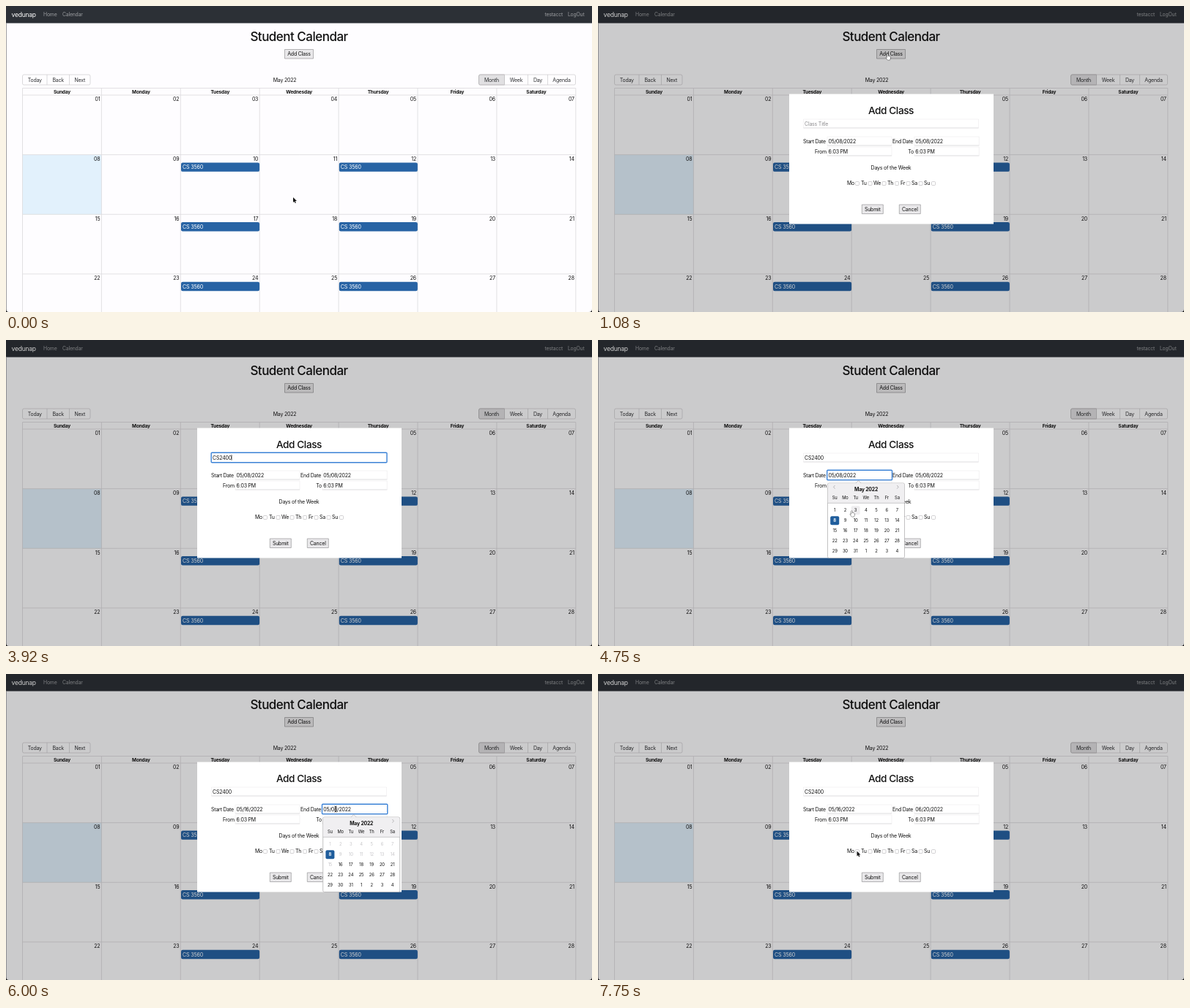
An HTML page with a canvas for the animation above (8 s loop, 800 px wide and 419 px high).

```html
<!DOCTYPE html>
<html lang="en">
<head>
<meta charset="utf-8">
<title>Student Calendar</title>
<style>
  html, body { margin: 0; width: 100%; height: 100%; overflow: hidden; background: #fefdff; }
  canvas { display: block; width: 800px; height: 419px; }
</style>
</head>
<body>
<canvas id="stage" width="800" height="419"></canvas>
<script>
const ctx = document.getElementById('stage').getContext('2d');
const LOOP = 8000;
const INK = '#111', BLUE = '#2763a4', FOCUS = '#3b82d6';
const WEEKDAYS = ['Sunday', 'Monday', 'Tuesday', 'Wednesday', 'Thursday', 'Friday', 'Saturday'];

const time = {
  modal: 1040, titleFocus: 2050, typing: [2720, 3000, 3380, 3540, 3700, 3860],
  startOpen: 4450, startPick: 5150, endOpen: 5540, nextMonth: 6450, endPick: 7150
};

// Pointer stops: time, x, y
const stops = [
  [0, 392, 262], [80, 392, 262], [670, 395.5, 66], [1400, 395.5, 66], [1900, 383, 161],
  [4150, 383, 161], [4420, 352, 185], [4480, 352, 185], [4730, 346.5, 234], [4800, 346.5, 234],
  [5080, 338, 259], [5180, 338, 259], [5480, 450, 185], [6030, 450, 185], [6380, 528, 200],
  [6500, 528, 200], [7020, 457, 273], [7500, 457, 273], [7740, 353.5, 242.5]
];
const pointerKinds = [
  [0, 'arrow'], [600, 'hand'], [1500, 'arrow'], [1830, 'beam'], [2720, 'none'], [4150, 'beam'],
  [4560, 'hand'], [5190, 'arrow'], [5440, 'beam'], [6120, 'arrow'], [6320, 'hand'], [7170, 'arrow']
];
const shapes = {
  arrow: new Path2D('M0 0V7L1.6 5.6L2.7 8L3.8 7.5L2.8 5.1H5Z'),
  hand: new Path2D('M-.7 .7C-.7-.2 .6-.2 .6 .7V2.8L3 3.3C3.8 3.5 3.9 4.2 3.7 5L3 7.8H-.2L-2.2 5C-2.6 4.2-1.6 3.7-.7 4.7Z'),
  beam: new Path2D('M-1.6-4Q0-4 0-3Q0-4 1.6-4M0-3V3M-1.6 4Q0 4 0 3Q0 4 1.6 4')
};

function text(str, x, y, { size = 7, weight = 400, color = INK, align = 'left' } = {}) {
  ctx.font = `${weight} ${size}px Inter, sans-serif`;
  ctx.letterSpacing = `${-0.03 * size}px`;
  ctx.textAlign = align;
  ctx.fillStyle = color;
  ctx.fillText(str, x, y + size * 0.36);
}
const centered = (str, x, y, style) => text(str, x, y, { ...style, align: 'center' });

function box(x, y, w, h, fill, stroke, radius = 0, lineWidth = 0.7) {
  ctx.beginPath();
  ctx.roundRect(x, y, w, h, radius);
  if (fill) { ctx.fillStyle = fill; ctx.fill(); }
  if (stroke) { ctx.strokeStyle = stroke; ctx.lineWidth = lineWidth; ctx.stroke(); }
}

function line(color, width, ...points) {
  ctx.beginPath();
  points.forEach(([x, y]) => ctx.lineTo(x, y));
  ctx.strokeStyle = color;
  ctx.lineWidth = width;
  ctx.stroke();
}

function button(label, x, y, w) {
  box(x, y, w, 12.5, '#e9e8ea', '#98979a');
  centered(label, x + w / 2, y + 6.2);
}

function toolbar(labels, edges, active) {
  const first = edges[0], last = edges[edges.length - 1];
  box(first, 94, last - first, 14, '#fefdff', '#cccbcd', 2);
  labels.forEach((label, i) => {
    const x = edges[i], w = edges[i + 1] - x;
    if (label === active) box(x, 94, w, 14, '#e1e0e2', '#a9a8aa', [2, 0, 0, 2]);
    else if (i) line('#cccbcd', 0.7, [x, 94], [x, 108]);
    centered(label, x + w / 2, 101, { color: '#2f3133' });
  });
}

function drawPage() {
  box(0, 0, 800, 419, '#fefdff');
  box(0, 0, 800, 23.5, '#2c3036');
  const link = { color: '#9b9da0', size: 6.9 };
  text('vedunap', 7.5, 11.8, { size: 8.6, color: '#fff' });
  text('Home', 51, 11.8, link);
  text('Calendar', 77, 11.8, link);
  text('testacct', 760, 11.8, { ...link, align: 'right' });
  text('LogOut', 789.5, 11.8, { ...link, align: 'right' });

  centered('Student Calendar', 400, 41.5, { size: 17, weight: 500 });
  button('Add Class', 380.5, 59.5, 39);
  toolbar(['Today', 'Back', 'Next'], [22.5, 56, 86.5, 115]);
  centered('May 2022', 380.5, 101);
  toolbar(['Month', 'Week', 'Day', 'Agenda'], [645.5, 680.5, 712.5, 739.5, 777.5], 'Month');

  const left = 22.5, colW = 107.9, top = 122, rowH = 81.65;
  box(left, top + rowH, colW, rowH, '#e2f1fc');
  for (let c = 0; c <= 7; c++) {
    const x = left + c * colW;
    line('#dbdadc', 0.8, [x, 112.5], [x, 419]);
    if (c < 7) centered(WEEKDAYS[c], x + colW / 2, 117.3, { size: 6.5, weight: 700 });
  }
  line('#dbdadc', 0.8, [left, 112.5], [777.8, 112.5]);
  for (let r = 0; r < 4; r++) {
    const y = top + r * rowH;
    line('#dbdadc', 0.8, [left, y], [777.8, y]);
    for (let c = 0; c < 7; c++) {
      const x = left + c * colW;
      text(String(r * 7 + c + 1).padStart(2, '0'), x + colW - 2, y + 5.7, { align: 'right' });
      if (r && (c === 2 || c === 4)) {
        box(x + 0.7, y + 10.8, colW - 0.8, 12.4, BLUE, null, 2.2);
        text('CS 3560', x + 2.7, y + 17, { color: '#fff', size: 7.2 });
      }
    }
  }
}

function input(value, x, y, w, focused, color = INK) {
  if (focused) box(x - 0.3, y - 0.7, w + 0.8, 13.4, '#fff', FOCUS, 1, 1.4);
  else {
    box(x, y, w, 12, '#fff', '#efeef0');
    line('#d9d8da', 0.7, [x, y + 12], [x + w, y + 12]);
  }
  text(value, x + 1.5, y + 6, { color });
}

function drawModal(t) {
  const startOpen = t >= time.startOpen && t < time.startPick;
  const endOpen = t >= time.endOpen && t < time.endPick;
  const titleFocused = t >= time.titleFocus && t < time.startOpen;
  const title = 'CS2400'.slice(0, time.typing.filter(k => t >= k).length);

  box(261, 120.5, 279, 178, '#fff');
  centered('Add Class', 400, 143, { size: 13.6, weight: 500 });
  input(title || 'Class Title', 280.5, 155, 239, titleFocused, title ? INK : '#8c8b8e');
  if (titleFocused && (t - time.titleFocus) % 1000 < 500 || titleFocused && t > time.typing[0]) {
    ctx.font = '400 7px Inter, sans-serif';
    ctx.letterSpacing = '-0.21px';
    const x = 282.2 + ctx.measureText(title).width;
    line(INK, 0.7, [x, 157], [x, 164.8]);
  }

  text('Start Date', 280, 185);
  input(t < time.startPick ? '05/08/2022' : '05/16/2022', 313, 179, 88, startOpen);
  text('End Date', 402, 185);
  input(t < time.endPick ? '05/08/2022' : '06/20/2022', 431.8, 179, 88.5, endOpen);
  text('From', 312, 199, { align: 'right' });
  input('6:03 PM', 313, 193, 88);
  text('To', 431, 199, { align: 'right' });
  input('6:03 PM', 431.8, 193, 88.5);

  centered('Days of the Week', 400, 221.5);
  const labelX = [340, 359, 376, 395, 413, 428, 445];
  const checkX = [354, 371.5, 390.5, 408, 423.5, 440.5, 458];
  ['Mo', 'Tu', 'We', 'Th', 'Fr', 'Sa', 'Su'].forEach((day, i) => {
    text(day, labelX[i], 242.5);
    box(checkX[i] - 2.5, 240.5, 5, 5, '#fff', '#b5b4b7', 1, 0.6);
  });
  button('Submit', 360.3, 272, 29);
  button('Cancel', 411.3, 272, 29);

  if (startOpen) drawPicker(313.5, 4, null, t);
  if (endOpen) drawPicker(432.7, t < time.nextMonth ? 4 : 5, new Date(2022, 4, 16), t);
}

function drawPicker(x, month, minDate, t) {
  const [px, py] = pointerAt(t);
  const mid = x + 52.5;
  box(x, 196, 105, 102.5, '#fff', '#a9a8aa', 2);
  box(x + 0.3, 196.3, 104.4, 27, '#f0eff1', null, [2, 2, 0, 0]);
  line('#a9a8aa', 0.6, [x, 223.3], [x + 105, 223.3]);
  ctx.beginPath();
  ctx.moveTo(x + 38.5, 196.4);
  ctx.lineTo(x + 42, 192.6);
  ctx.lineTo(x + 45.5, 196.4);
  ctx.fillStyle = '#f0eff1';
  ctx.fill();
  line('#a9a8aa', 0.6, [x + 38.5, 196], [x + 42, 192.4], [x + 45.5, 196]);

  const chevron = (cx, dir) => line('#b5b4b7', 1, [cx - dir, 199], [cx + dir, 201.3], [cx - dir, 203.6]);
  if (!minDate || month > 4) chevron(x + 9, -1);
  chevron(x + 95.7, 1);
  centered(`${month === 4 ? 'May' : 'June'} 2022`, mid, 204.7, { size: 6.9, weight: 700 });

  const first = new Date(2022, month, 1);
  for (let i = 0; i < 35; i++) {
    const cx = x + 9.7 + (i % 7) * 14.2, cy = 233.3 + Math.floor(i / 7) * 14;
    if (i < 7) centered(WEEKDAYS[i].slice(0, 2), cx, 215.7, { size: 5.8 });
    const date = new Date(2022, month, 1 - first.getDay() + i);
    const selected = date.getMonth() === 4 && date.getDate() === 8;
    const disabled = minDate && date < minDate;
    const hovered = Math.abs(px - cx) < 6 && Math.abs(py - cy) < 6;
    if (selected) box(cx - 6, cy - 6, 12, 12, '#1f5d9c', null, 2);
    else if (hovered && !disabled) box(cx - 6, cy - 6, 12, 12, '#eeedef', null, 2);
    centered(date.getDate(), cx, cy, {
      size: 5.9, weight: selected ? 700 : 400,
      color: selected ? '#fff' : disabled ? '#c6c5c8' : INK
    });
  }
}

function pointerAt(t) {
  const i = stops.findIndex(s => s[0] > t);
  if (i < 0) return stops[stops.length - 1].slice(1);
  const [t0, x0, y0] = stops[i - 1], [t1, x1, y1] = stops[i];
  const p = (t - t0) / (t1 - t0), e = p * p * (3 - 2 * p);
  return [x0 + (x1 - x0) * e, y0 + (y1 - y0) * e];
}

function drawPointer(t) {
  const kind = pointerKinds.filter(k => k[0] <= t).pop()[1];
  if (kind === 'none') return;
  ctx.save();
  ctx.translate(...pointerAt(t));
  if (kind === 'beam') {
    ctx.strokeStyle = INK;
    ctx.lineWidth = 0.8;
    ctx.stroke(shapes.beam);
  } else {
    const dark = kind === 'arrow';
    ctx.lineWidth = dark ? 1 : 0.8;
    ctx.strokeStyle = dark ? '#fff' : '#111';
    ctx.fillStyle = dark ? '#111' : '#fff';
    ctx.stroke(shapes[kind]);
    ctx.fill(shapes[kind]);
  }
  ctx.restore();
}

function drawWindowEdge() {
  box(0, 23.5, 0.7, 395.5, '#77767a');
  ctx.beginPath();
  ctx.rect(0, 410, 800, 9);
  ctx.roundRect(0, 400, 800, 19, [0, 0, 4, 4]);
  ctx.rect(0, 400, 800, 10);
  ctx.fillStyle = '#111';
  ctx.fill('evenodd');
}

function frame(now) {
  const t = now % LOOP;
  drawPage();
  if (t >= time.modal) {
    box(0, 0, 800, 419, 'rgba(0, 0, 0, 0.2)');
    drawModal(t);
  }
  drawWindowEdge();
  drawPointer(t);
  requestAnimationFrame(frame);
}
requestAnimationFrame(frame);
</script>
</body>
</html>
```
